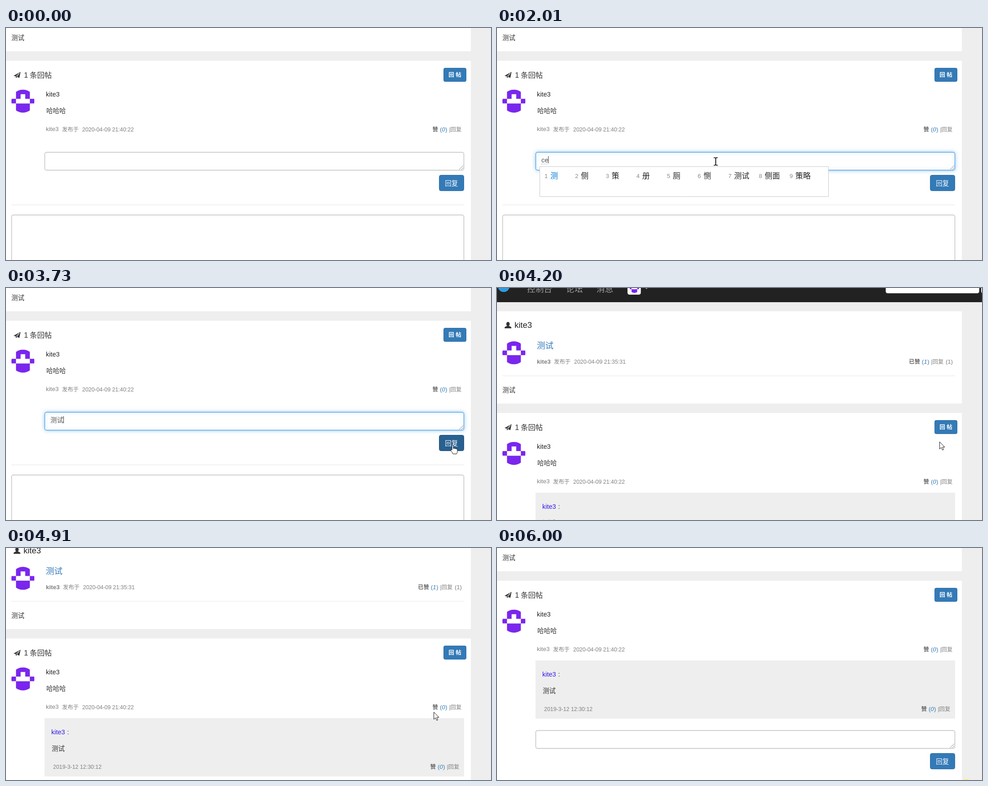
An HTML page with a canvas that plays this animation: 1082 px wide and 518 px high, repeating every 6090 ms.

```html
<!DOCTYPE html>
<html lang="zh">
<head>
<meta charset="utf-8">
<title>回帖</title>
<style>
html, body { margin: 0; width: 100%; height: 100%; overflow: hidden; background: #fff; }
canvas { display: block; }
</style>
</head>
<body>
<canvas id="stage" width="1082" height="518"></canvas>
<script>
const ctx = document.getElementById('stage').getContext('2d');
const LOOP = 6090, STEP = 78.4, RELOAD = 3960;
const FONT = '"Liberation Sans", "Noto Sans CJK SC", "Noto Sans CJK", sans-serif';
const USER = 'kite3';
const BLUE = '#337ab7', GREY = '#edeeed', DARK = '#333', META = '#808080', PURPLE = '#7a26ee';

// [time, x, y]
const ENTER = [[70, 545, 477], [310, 510, 385], [540, 488, 302], [620, 488, 298]];
const LEAVE = [
  [3180, 505, 293], [3400, 730, 229], [3560, 930, 325], [3640, 982, 376],
  [3729, 996, 350], [3960, 996, 350], [4199, 987, 343], [4600, 972, 352],
  [4905, 954, 366], [5060, 962, 395], [5250, 985, 460], [5440, 1005, 530]
];

// [time, typed, right, bottom, candidates]
const IME = [
  [1860, 'c', 586, 350, '才 从 次 成 出 错 曾'],
  [2010, 'ce', 740, 377, '测 侧 策 册 厕 恻 测试 侧面 策略'],
  [2160, "ce's", 740, 377, '测试 厕所 测速 测算 测 侧 策'],
  [2250, "ce'sh", 711, 350, '测试 侧视 测 侧 策 册 厕'],
  [2400, "ce'shi", 711, 350, '测试 侧室 侧视 测 侧 策 册']
];

const ARROW = new Path2D('M0 0V16L3.7 12.6L6.3 18.4L8.9 17.3L6.4 11.7H11.4Z');
const HAND = new Path2D('M-1.5 1.5Q0-1.5 1.5 1.5V8Q3.5 6 5 8.4Q7 7 8.2 9Q10.6 8 10.6 11V14Q10.6 17 8.6 20H0.6Q-1 16-4.2 12.4Q-5 9.6-1.5 11Z');
const PLANE = new Path2D('M0 8.5L15.5 0L12.8 13.2L7.6 11.2L5.2 14L4.6 10Z');

const clamp = v => Math.max(0, Math.min(1, v));
const smooth = v => (v = clamp(v), v * v * (3 - 2 * v));
const between = (t, a, b) => t >= a && t < b;

function follow(keys, t) {
  let i = 0;
  while (i < keys.length - 2 && t >= keys[i + 1][0]) i++;
  const [a, b] = [keys[i], keys[i + 1]];
  const p = clamp((t - a[0]) / (b[0] - a[0]));
  return [a[1] + (b[1] - a[1]) * p, a[2] + (b[2] - a[2]) * p];
}

function text(s, x, y, size, color = DARK, style = '', align = 'left') {
  ctx.font = `${style} ${size}px ${FONT}`;
  ctx.fillStyle = color;
  ctx.textAlign = align;
  ctx.fillText(s, x, y);
}

function fill(x, y, w, h, color) {
  ctx.fillStyle = color;
  ctx.fillRect(x, y, w, h);
}

function box(x, y, w, h, r, bg, line, width = 1) {
  ctx.beginPath();
  ctx.roundRect(x + .5, y + .5, w - 1, h - 1, r);
  ctx.fillStyle = bg;
  ctx.fill();
  ctx.strokeStyle = line;
  ctx.lineWidth = width;
  ctx.stroke();
}

function avatar(x, y, size, round) {
  const c = size / 5;
  ctx.save();
  ctx.translate(x, y);
  if (round) {
    ctx.beginPath();
    ctx.arc(size / 2, size / 2, size / 2, 0, 7);
    ctx.clip();
  }
  ctx.fillStyle = PURPLE;
  ctx.fillRect(c, 0, 3 * c, 2 * c);
  ctx.fillRect(0, 2 * c, size, c);
  ctx.fillRect(c, 3 * c, 3 * c, 2 * c);
  ctx.fillStyle = '#fff';
  ctx.fillRect(2 * c, c, c, c + 1);
  ctx.fillRect(c, 2 * c, 3 * c, c);
  ctx.restore();
}

function likes(label, n, x, y) {
  text(label, x, y, 12.4, '#666', 'bold');
  const px = x + 12.4 * label.length + 4;
  text('(', px, y, 13.2, BLUE);
  text(n, px + 4.4, y, 13.2, BLUE, 'italic');
  text(')', px + 12.2, y, 13.2, BLUE);
  text('|回复', px + 20.5, y, 12.4, META);
}

function grip(x, y) {
  ctx.strokeStyle = '#888';
  ctx.lineWidth = 1;
  ctx.beginPath();
  ctx.moveTo(x - 9, y); ctx.lineTo(x, y - 9);
  ctx.moveTo(x - 4, y); ctx.lineTo(x, y - 4);
  ctx.stroke();
}

function field(y, focus) {
  ctx.save();
  if (focus > 0) {
    ctx.shadowColor = `rgba(102,175,233,${.6 * focus})`;
    ctx.shadowBlur = 8;
  }
  const mix = (a, b) => Math.round(a + (b - a) * focus);
  box(86, y, 936, 41, 4, '#fff', `rgb(${mix(190, 88)},${mix(190, 165)},${mix(190, 224)})`, 1.4);
  ctx.restore();
  grip(1020, y + 39);
}

function navbar() {
  fill(0, -240, 1082, 64, '#222');
  fill(0, -176, 1082, 1.5, '#080808');
  ctx.fillStyle = '#2f9be0';
  ctx.beginPath();
  ctx.arc(15, -210, 13, 0, 7);
  ctx.fill();
  text('控制台', 67, -197, 18.7, '#9d9d9d');
  text('论坛', 154, -197, 18.7, '#9d9d9d');
  text('消息', 222, -197, 18.7, '#9d9d9d');
  box(291, -222, 30, 31, 4, '#fff', '#ddd');
  avatar(296, -216, 21, true);
  ctx.fillStyle = '#9d9d9d';
  ctx.beginPath();
  ctx.moveTo(329, -208); ctx.lineTo(338, -208); ctx.lineTo(333.5, -203.5);
  ctx.fill();
  box(867, -230, 209, 36, 4, '#fff', '#ccc');
  box(1080, -230, 40, 36, 4, '#fff', '#ccc');
}

function post() {
  fill(0, -154, 1037, 206, '#fff');
  ctx.fillStyle = DARK;
  ctx.beginPath();
  ctx.ellipse(24.5, -125.5, 3.8, 4.8, 0, 0, 7);
  ctx.fill();
  ctx.fill(new Path2D('M17-116V-118Q18-120 23-121.5H26Q31-120 32-118V-116Z'));
  text(USER, 39, -117, 18.5, '#222');
  avatar(12, -87, 51.5, true);
  text('测试', 89, -71, 18.5, BLUE);
  text(USER, 89, -37, 13.5, META, 'bold');
  text('发布于', 127, -37, 12.4, META);
  text('2020-04-09 21:35:31', 172, -37, 12.4, META);
  likes('已赞', '1', 919, -37);
  text('(1)', 1017, -37, 13.2, META, '', 'right');
  fill(12, -10.5, 1010, 1, '#e8e8e8');
  text('测试', 12, 26.5, 14.5);
}

function reply() {
  fill(86, 251, 936, 130, GREY);
  text(USER, 101, 287, 14.5, '#2f18ec');
  text(':', 136.5, 287, 14.5);
  text('测试', 102, 323.5, 14.5);
  text('2019-3-12 12:30:12', 105, 364, 12.4, META);
  likes('赞', '0', 946.5, 364);
}

function thread(t) {
  const done = t >= RELOAD, shift = done ? 130 : 0;
  fill(0, 73, 1037, 700, '#fff');
  ctx.save();
  ctx.translate(17, 98);
  ctx.fillStyle = DARK;
  ctx.fill(PLANE);
  ctx.strokeStyle = '#fff';
  ctx.lineWidth = 1;
  ctx.beginPath();
  ctx.moveTo(5, 10); ctx.lineTo(13, 2.5); ctx.lineTo(7.4, 11);
  ctx.stroke();
  ctx.restore();
  text('1', 40, 111, 16.5);
  text('条回帖', 53, 111, 16.4);
  box(976, 89, 51, 31, 3, BLUE, '#2e6da4');
  text('回 帖', 1001.5, 108.5, 12.5, '#fff', 'bold', 'center');
  avatar(12, 137.5, 51.5, true);
  text(USER, 89, 153, 14.5, '#222');
  text('哈哈哈', 90, 189.5, 14.5);
  text(USER, 89, 230, 13.5, META);
  text('发布于', 125, 230.5, 12.4, META);
  text('2020-04-09 21:40:22', 170, 230.5, 12.4, META);
  likes('赞', '0', 951.5, 230.5);
  if (done) reply();

  field(277 + shift, done ? 0 : smooth((t - 590) / 240));
  const hot = between(t, 3680, RELOAD);
  box(966, 328 + shift, 56, 36, 4, hot ? '#286090' : BLUE, hot ? '#204d74' : '#2e6da4');
  text('回复', 993.7, 351.5 + shift, 14.5, '#fff', '', 'center');
  fill(12, 394.5 + shift, 1010, 1, '#e6e6e6');
  box(12, 417 + shift, 1010, 170, 4, '#fff', '#bebebe', 1.4);
  if (!done) typing(t);
}

function typing(t) {
  let end = 99;
  const ime = between(t, 1860, 2650) && IME.filter(k => t >= k[0]).pop();
  if (ime) {
    const [, typed, right, bottom, list] = ime;
    text(typed, 99, 300, 14.5, '#555');
    end += ctx.measureText(typed).width;
    ctx.strokeStyle = '#555';
    ctx.lineWidth = 1;
    ctx.setLineDash([1, 2]);
    ctx.beginPath();
    ctx.moveTo(99, 303.5); ctx.lineTo(end, 303.5);
    ctx.stroke();
    ctx.setLineDash([]);
    box(95, 309, right - 95, bottom - 309, 0, '#fff', '#c8c8c8');
    const words = list.split(' '), gap = (right - 125) / words.length;
    words.forEach((w, i) => {
      const x = 106 + i * gap;
      text(i + 1, x, 335, 13, '#888');
      text(w, x + 13, 336, 17, i ? '#222' : '#0078d7');
    });
  } else if (t >= 2650) {
    text('测试', 99, 300, 14.5, '#555');
    end = 128;
  }
  const caret = between(t, 620, 1080) || between(t, 1610, 3180) || t >= 3700;
  if (caret) fill(Math.round(end), 286, 1, 16, '#333');
}

function beam(x, y) {
  ctx.beginPath();
  for (const s of [-1, 1]) {
    ctx.moveTo(x - 4.5, y + 8.5 * s);
    ctx.lineTo(x - 1.5, y + 8.5 * s);
    ctx.lineTo(x, y + 7 * s);
    ctx.lineTo(x + 1.5, y + 8.5 * s);
    ctx.lineTo(x + 4.5, y + 8.5 * s);
  }
  ctx.moveTo(x, y - 7);
  ctx.lineTo(x, y + 7);
  ctx.strokeStyle = '#fff';
  ctx.lineWidth = 3.2;
  ctx.stroke();
  ctx.strokeStyle = '#000';
  ctx.lineWidth = 1.7;
  ctx.stroke();
}

function pointer(t) {
  if (t < 70 || t >= 5440) return;
  const late = t >= 3180, start = late ? 3180 : 70;
  const held = start + Math.floor((t - start) / STEP) * STEP;
  const [x, y] = follow(late ? LEAVE : ENTER, held);
  const inField = t < RELOAD && (between(y, 277, 318) || y > 417) && x < 940;
  if (inField) return beam(Math.round(x), Math.round(y));
  ctx.save();
  ctx.translate(Math.round(x) + .5, Math.round(y) + .5);
  const shape = between(t, 3680, RELOAD) ? HAND : ARROW;
  ctx.fillStyle = '#fff';
  ctx.fill(shape);
  ctx.strokeStyle = '#111';
  ctx.lineWidth = 1;
  ctx.stroke(shape);
  ctx.restore();
}

function scroll(t) {
  if (t < RELOAD) return 0;
  const held = 3180 + Math.floor((t - 3180) / STEP) * STEP;
  return Math.round(206 * (1 - smooth((held - 4797) / 260)));
}

function draw(now) {
  const t = now % LOOP;
  fill(0, 0, 1082, 518, GREY);
  ctx.save();
  ctx.translate(0, scroll(t));
  navbar();
  post();
  thread(t);
  ctx.restore();
  pointer(t);
  if (t >= 6000) {
    ctx.fillStyle = '#f6f64a';
    ctx.beginPath();
    ctx.arc(1047, 529, 13, 0, 7);
    ctx.fill();
  }
}

const begin = performance.now();
function tick() {
  draw(performance.now() - begin);
  requestAnimationFrame(tick);
}
tick();
</script>
</body>
</html>
```
